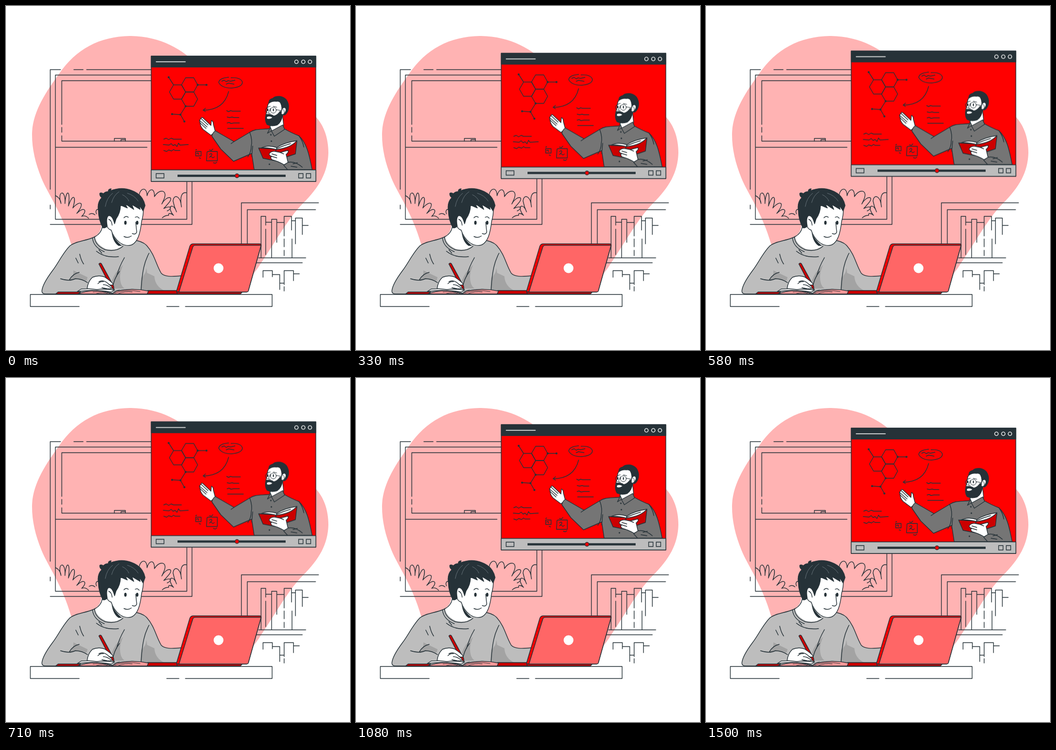
Recreate the animation shown at these times as an HTML page without scripts. Size 700 px wide and 700 px high, loop 1540 ms.

```html
<!DOCTYPE html>
<html lang="en">
<head>
<meta charset="utf-8">
<title>Online lesson</title>
<style>
html, body { margin: 0; width: 100%; height: 100%; overflow: hidden; background: #fff; }
svg { display: block; width: 100%; height: 100%; }
.ink { stroke: #263238; stroke-width: 1.4; stroke-linecap: round; stroke-linejoin: round; }
.line { fill: none; }
.thin { stroke-width: 1; }
.plain { stroke: none; }
.dark { fill: #263238; }
.white { fill: #fff; }
.red { fill: #f00; }
.deep { fill: #c00; }
.coral { fill: #f66; }
.grey { fill: #bdbdbd; }
.shade { fill: #a3a3a3; }
.shirt { fill: #757575; }
.pink { fill: #ffb3b3; }
.strands { stroke: #657178; stroke-width: 1; }
.track { stroke-width: 4.5; stroke-linecap: butt; }
.float { animation: float 1540ms linear infinite; }
@keyframes float {
  0%, 1%, 95.5%, 100% { transform: translateY(0); }
  48% { transform: translateY(-13.3px); }
}
</style>
</head>
<body>
<svg viewBox="0 0 700 700">
  <path class="pink" d="M252 61C314 61 360 89 390 120C470 190 565 186 615 213C646 232 656 268 656 299C655 338 638 368 604 402C575 431 550 477 519 523Q500 555 470 575H160Q146 530 133 486C114 420 86 384 72 350C60 320 53 292 53 262C53 216 82 174 108 138C142 88 190 62 252 61Z"/>

  <g class="ink line">
    <!-- room window -->
    <path d="M90 373V129.500H111M138 129.500H157M164 129.500H300M90 405V413M300 140.500H100.500V434H368V335M300 152H113.500V241M113.500 247V257M113.500 264V275H300M101 287.500H287M90 444.500H378.500V335"/>
    <path d="M220.500 275V269.500H243V275M234 275V272H243"/>
    <!-- bushes -->
    <path d="M101 386Q111 391 112 402C103 376 122 371 120 402C122 371 132 374 127 407C136 380 144 386 136 411C151 394 162 400 144 422C157 408 168 414 154 428Q162 425 168 432M169 424Q176 420 181 425M184 423C181 415 187 411 190 416"/>
    <path d="M271 384C274 369 287 368 287 386C291 370 303 369 302 388C312 371 329 374 322 392Q319 399 317 403C327 384 344 387 330 402Q325 408 321 412C337 405 339 412 328 417M367 380C356 378 354 391 357 409C355 385 341 382 340 397Q342 408 347 419C342 404 333 405 334 413Q336 421 341 426C336 421 329 421 331 426Q323 426 318 431"/>
    <!-- shelf -->
    <path d="M479 486V400.500H636M491 486V414.500H630M514 512.500H610M508 522.500H603"/>
    <path d="M519 512V428H528.500V446M528.500 454V506M528.500 440H540.500V512M540.500 434H551V481M540.500 440V434M551 440.500H566M566 468V428H581V456M566 474V490M566 497V508M582 474V512M581 437H589V431.500H603V465M589 431.500V484M603 446.500H615"/>
    <path d="M523 552V538.500H542V551M542 546.500H557V577M557 564H566V538.500H585V559M566 564V567M566 571V580M585 545H597"/>
  </g>

  <!-- student -->
  <g class="ink">
    <path class="grey" d="M180 470C160 479 143 478 130 488C116 502 107 522 95 538Q74 566 73 580Q73 586 81 586H350L357 549C336 551 323 551 316 544C305 526 303 506 286 487Q277 478 258 476Z"/>
    <path class="shade plain" d="M137 538Q139 551 128 557Q147 553 164 559L166 552ZM238 527Q222 541 216 558L217 575H241Q229 565 233 541ZM286 533Q284 547 275 553L273 579H322Q303 570 302 550L287 543Z"/>
    <path class="white plain" d="M194 440Q195 461 181 469Q184 486 205 495Q226 498 236 488L231 478L245 460Z"/>
    <path class="line" d="M196 449Q194 463 180 470Q181 487 202 496Q224 501 238 489M176 472Q178 491 200 500"/>
    <path class="dark plain" d="M215 461Q221 476 236 488L229 488Q218 481 215 461Z"/>
    <path class="white" d="M225 405L279 404Q281 422 276 438C273 464 268 480 256 486Q245 490 232 482Q219 472 214 456Q204 453 203 437Q202 425 211 426Q217 427 219 432Z"/>
    <path class="dark" d="M197 451Q188 434 188 416Q185 400 195 390Q190 386 191 381Q194 379 198 382Q203 377 208 378Q208 372 214 372Q213 374 213 376Q241 365 267 381Q280 390 283 406L279 417L271 405L273 414L256 404L260 414L242 402L247 411L233 405Q233 421 224 433L221 443Q216 424 208 427Q203 432 206 448Q201 453 197 451Z"/>
    <path class="line strands" d="M202 408Q205 390 217 381M215 400Q219 385 230 378M247 381Q261 385 269 397M237 384Q247 389 250 397"/>
    <path class="line" d="M209 434Q215 436 216 446M240 431Q244 426 249 430M263 430Q268 427 271 432M264 440L266 460Q264 466 257 463M240 469Q248 473 255 468"/>
    <ellipse class="dark plain" cx="243" cy="441" rx="2.500" ry="4"/>
    <ellipse class="dark plain" cx="267" cy="441" rx="2.500" ry="4"/>
    <path class="line" d="M150 505Q153 518 158 525M142 513L147 523M189 496L195 503M184 499Q201 513 229 510M291 503C282 520 277 538 275 578M241 512Q230 531 225 550M231 540Q219 556 217 574M111 555Q129 561 141 555Q155 555 166 563M129 557Q137 544 149 542"/>
  </g>

  <!-- desk and notebook -->
  <rect class="white" x="49" y="587" width="493" height="25"/>
  <path class="ink line" d="M149 611.500H49.500V587H541.500V611.500H365M327 611.500H352"/>
  <g class="ink">
    <path class="deep" d="M101 586L106 582H152L147 586ZM288 579H353L349 586H284Z"/>
    <path d="M146 586Q168 577 195 580L217 585L225 580Q258 573 290 580L287 586Z" fill="#ff9999"/>
    <path class="white" d="M145 581L153 576Q181 574 221 578L214 582Q178 576 145 581Z"/>
    <path class="line thin" d="M177 582Q197 579 212 585M184 585Q198 582 207 585M221 584Q243 576 273 581M229 585Q242 580 257 582M217 585Q221 579 231 578"/>
    <path class="deep" d="M189 525Q191 522 194 524L219 570L220 577L214 573Z"/>
    <path class="white" d="M165 575Q167 560 176 552Q188 547 200 551Q215 561 218 566Q216 570 209 566L216 572Q214 577 204 575L185 577Z"/>
    <path class="line" d="M189 561Q199 556 209 566M198 567Q205 567 213 573M195 573L204 575M187 565Q192 560 198 561"/>
  </g>

  <!-- laptop -->
  <g class="ink">
    <path class="deep" d="M347 582H481L477 586H349Z"/>
    <path class="red" d="M347 580L374 489Q376 484 381 484H516Q520 484 519 488L493 580Q492 582 489 582H349Z"/>
    <path class="coral" d="M352 582L380 491Q381 487 385 487H519L493 580Q492 582 489 582Z"/>
    <circle class="white plain" cx="432.500" cy="533.500" r="10"/>
  </g>

  <!-- video call -->
  <g class="float ink">
    <rect class="red" x="295.500" y="102" width="335" height="255"/>
    <rect class="dark" x="295.500" y="102" width="335" height="22.300"/>
    <g class="line" stroke="#fff">
      <path d="M305.500 113.500H365"/>
      <circle cx="591" cy="113.500" r="3.600"/>
      <circle cx="605" cy="113.500" r="3.600"/>
      <circle cx="618.500" cy="113.500" r="3.600"/>
    </g>

    <!-- board notes -->
    <g class="line">
      <path id="hex" d="M365.500 146H382L390 160.500L382 175H365.500L357 160.500Z"/>
      <use href="#hex" x="-24.500" y="14.500"/>
      <use href="#hex" y="29"/>
      <path d="M341 160.500L331 145M390 160.500H408M365.500 204L355 221L338 220M355 221L363 235"/>
      <path stroke-width="4.200" d="M331 145h0M390 160.500h0M408 160.500h0M365.500 204h0M355 221h0M338 220h0M363 235h0"/>
      <path d="M453 145Q433 147 433 156Q439 167 459 167Q481 165 481 155Q478 145 458 146M439 153L444 151L448 154L452 152L457 153L466 151M448 159L453 157L464 159"/>
      <path d="M453 174C448 194 434 212 401 212L406 208M401 212L406 215"/>
      <path d="M449 213L453 215L457 213L461 214H477M450 226L455 227L460 226L464 227L474 227M450 238L454 237L458 239L464 238L475 238M451 249H483"/>
      <path d="M321 271L326 269L331 272L336 269L341 271H357M320 282L332 283L336 280L340 284L344 282L348 286L351 279L354 283L371 282M321 294L327 296L331 293L337 295L341 292L344 294H354"/>
      <path d="M386 296H397V305H386ZM388 300L391 299L392 302M409 298Q409 296 412 296H430V315H408ZM414 302Q419 298 419 303L414 308L417 306L421 309L424 307M386 293L388 292M393 309L396 310M414 293L418 294L421 291M422 319L426 320L429 318"/>
    </g>

    <!-- teacher -->
    <path class="white" d="M426 256L422 241Q422 234 418 233L417 243L401 228Q397 225 397 229Q392 233 395 237Q395 245 401 251Q409 257 417 263Z"/>
    <path class="line" d="M397 229L411 242M394 233L409 246M395 238L407 249"/>
    <path class="shirt" d="M541 249C520 252 507 249 496 257L464 276L426 254Q420 258 419 265L437 291L463 316L500 300L505 333H623C617 302 612 279 596 264Q582 259 563 248Z"/>
    <path class="line" d="M496 257Q502 273 499 286Q499 297 492 307M464 276L458 280M596 264Q604 275 606 287M502 285L500 306"/>
    <path class="white" d="M540 232Q538 243 537 248L543 257L565 243L562 215Z"/>
    <path class="shirt" d="M538 247L532 259L540 254L546 265L567 251L563 242L541 254Z"/>
    <g class="dark plain"><circle cx="540" cy="275" r="1.500"/><circle cx="536" cy="322" r="1.500"/><circle cx="539" cy="262" r="1.500"/></g>
    <path class="white" d="M537 193Q531 202 531 213Q528 221 530 227Q540 239 555 230L567 220V193Z"/>
    <path class="dark" d="M535 198Q534 190 543 188Q547 183 558 184Q573 187 575 203Q576 215 567 222L560 217Q563 206 559 198Q557 193 550 194Q541 193 535 198Z"/>
    <path class="dark" d="M529 221Q538 219 545 224Q553 222 558 214L563 221Q561 236 552 242Q541 246 531 241Q526 233 529 221Z"/>
    <path class="white" d="M561 211Q565 204 569 208Q572 212 566 219Q562 223 560 219Z"/>
    <path class="white plain" d="M531 226Q536 223 542 227Q537 231 531 229Z"/>
    <path class="line thin" d="M533 205L538 204M544 204L551 206M538 208L534 218L538 219M550 211L561 213M563 211Q567 210 566 217"/>
    <circle class="line thin" cx="544" cy="212" r="6"/>
    <path class="line thin" d="M534 206Q528 207 528 212Q528 217 533 218M537 212H539"/>
    <path class="dark plain" d="M543 209h2v5h-2zM532 209h2v5h-2z"/>

    <!-- open book -->
    <path class="deep" d="M514 289L549 291L592 275L589 301L548 315L523 310Z"/>
    <path class="line" d="M549 291L548 315"/>
    <path class="white" d="M519 289Q533 282 551 288Q566 278 592 274Q579 289 550 292Q532 287 519 289Z"/>
    <path class="line" d="M551 288L550 292M551 290Q565 284 579 280"/>
    <path class="white" d="M536 300Q540 295 548 296L558 298L573 294Q577 296 570 302L574 319L566 323Q551 315 542 313Q536 308 541 306Q534 304 536 300Z"/>
    <path class="line" d="M541 301L551 304M541 306L551 309M558 298L565 301"/>
    <path class="shirt" d="M574 318Q588 315 603 328M574 318L565 324L573 333H608"/>
    <path class="line" d="M584 321L593 319M580 326L592 328"/>

    <!-- player bar -->
    <rect class="grey" x="295.500" y="333.500" width="335" height="23.500"/>
    <path class="line track" d="M349 345.500H569"/>
    <circle class="red" cx="470" cy="345.500" r="4"/>
    <path class="line" stroke-linejoin="miter" d="M305.500 341H321.500V350H305.500ZM595.500 341H604.500V350H595.500ZM611 341H620V350H611Z"/>
  </g>
</svg>
</body>
</html>
```
